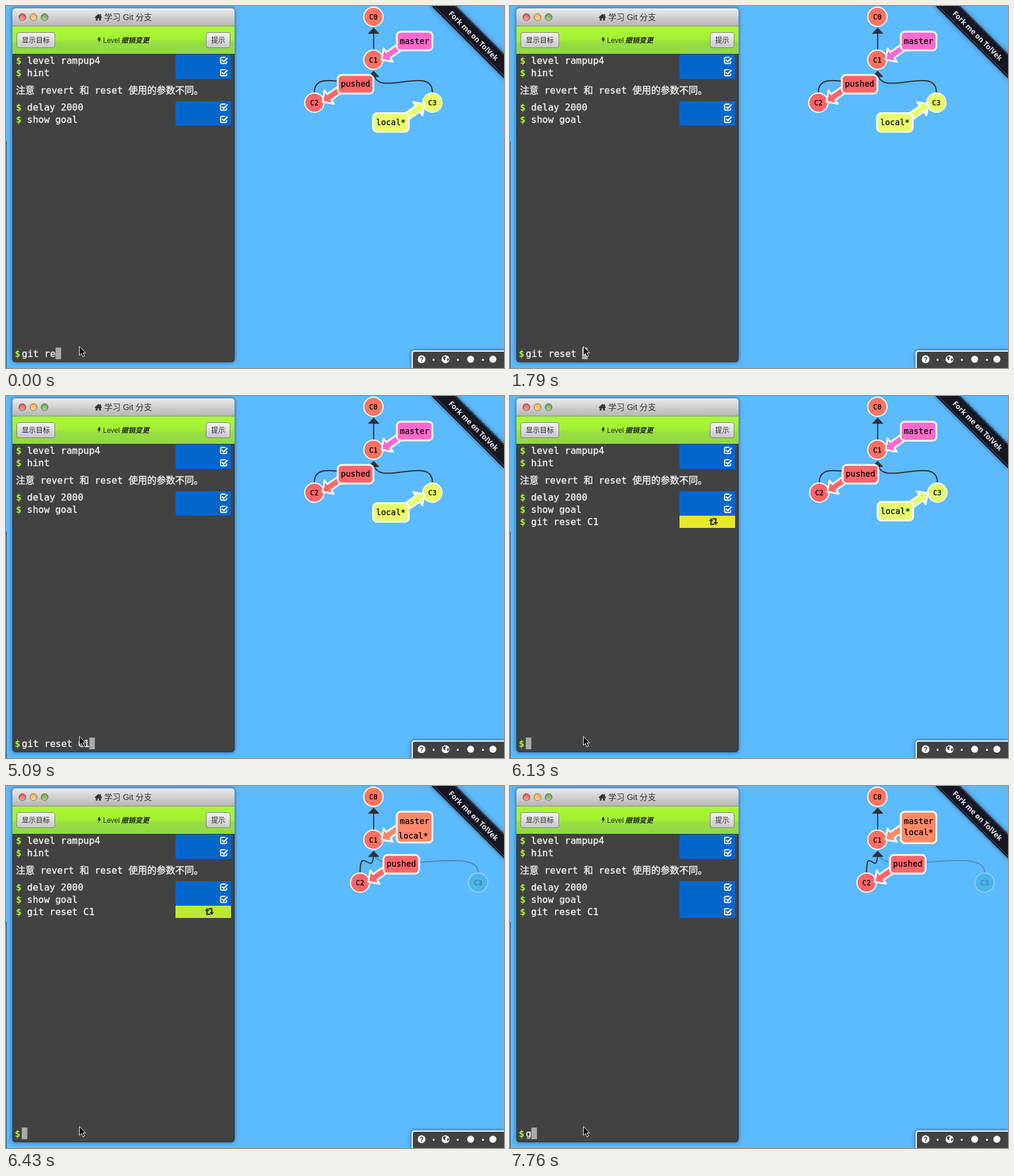
An HTML page that plays this animation: 852 px wide and 620 px high, repeating every 8 s.

```html
<!DOCTYPE html>
<html lang="zh">
<head>
<meta charset="utf-8">
<title>Git 分支</title>
<style>
html, body { margin: 0; width: 100%; height: 100%; overflow: hidden; background: #5cbaff; }
svg { display: block; width: 852px; height: 620px; }
.mono { font-family: "DejaVu Sans Mono", "Noto Sans CJK SC", "Noto Sans CJK", monospace; }
.ui { font-family: "Liberation Sans", "Noto Sans CJK SC", "Noto Sans CJK", sans-serif; }
.term { font-size: 16px; white-space: pre; }
.term text { fill: #f0f0f0; stroke: #f0f0f0; stroke-width: .4; }
.term .prompt { fill: #a6f33a; stroke: none; font-weight: bold; }
.tag, .node { text-anchor: middle; fill: #000; stroke: #000; stroke-width: .25; }
.tag { font-size: 14px; }
.node { font-size: 12px; }
.box { stroke: #fff; stroke-width: 3; stroke-linejoin: round; }
.ring { stroke: #fff; stroke-width: 2; }
.edge { fill: none; stroke: #2e2e31; stroke-width: 2; }
.head { fill: #2e2e31; stroke: #2e2e31; }
.btn { fill: url(#btnFill); stroke: #7d7d7d; }
.mid { text-anchor: middle; }
</style>
</head>
<body>
<svg viewBox="0 0 852 620">
  <defs>
    <linearGradient id="barFill" x2="0" y2="1"><stop stop-color="#ebebeb"/><stop offset="1" stop-color="#b4b4b4"/></linearGradient>
    <linearGradient id="limeFill" x2="0" y2="1"><stop stop-color="#a9f833"/><stop offset=".48" stop-color="#a4f034"/><stop offset=".6" stop-color="#96de42"/><stop offset="1" stop-color="#91d945"/></linearGradient>
    <linearGradient id="btnFill" x2="0" y2="1"><stop stop-color="#f4f4f4"/><stop offset="1" stop-color="#c6c6c6"/></linearGradient>
    <linearGradient id="gloss" x2="0" y2="1"><stop stop-color="#fff" stop-opacity=".1"/><stop offset="1" stop-color="#fff" stop-opacity=".5"/></linearGradient>
    <filter id="shadow" x="-10%" y="-10%" width="120%" height="120%"><feDropShadow dx="0" dy="0" stdDeviation="3.5" flood-opacity=".55"/></filter>
    <symbol id="check" viewBox="0 0 17 15" width="17" height="15" overflow="visible">
      <path d="M12.5 8.5v1.8a2.2 2.2 0 0 1-2.2 2.2h-6a2.2 2.2 0 0 1-2.2-2.2v-6a2.2 2.2 0 0 1 2.2-2.2h6.2" fill="none" stroke="currentColor" stroke-width="2"/>
      <path d="M4.5 6.3l3 3 6.4-6.4" fill="none" stroke="currentColor" stroke-width="2.5"/>
    </symbol>
  </defs>

  <rect width="852" height="620" fill="#5cbaff"/>
  <rect y="232" width="1" height="388" fill="#34424f"/>

  <g id="tree" class="mono"></g>

  <!-- ribbon -->
  <g filter="url(#shadow)"><path d="M726 -2L854 126V84L768 -2z" fill="#161922"/></g>
  <path d="M731 -1L853 121M767 -1L853 85" stroke="#5b606c" fill="none"/>
  <text transform="translate(800 51) rotate(45)" y="4.5" class="mid" font-family="'Open Sans', sans-serif" font-size="12.5" font-weight="700" fill="#e4e6ea">Fork me on TolVek</text>

  <!-- window -->
  <g filter="url(#shadow)"><rect x="11" y="4" width="380" height="606" rx="5" fill="#424242"/></g>
  <path d="M11 35V9a5 5 0 0 1 5-5H386a5 5 0 0 1 5 5V35z" fill="url(#barFill)"/>
  <rect x="11" y="34" width="380" height="1" fill="#8a8f86"/>
  <rect x="11" y="35" width="380" height="47" fill="url(#limeFill)"/>
  <rect x="11" y="82" width="380" height="1" fill="#33372c"/>
  <path d="M11.5 82V604.5a5 5 0 0 0 5 5H385.5a5 5 0 0 0 5-5V82" fill="none" stroke="#303030"/>
  <g id="lights"></g>
  <path d="M151.5 19.5L158 13.5l2.5 2.3V14h2v3.7l2 1.8-1 1-1-.8V25h-3.3v-3.8h-2.4V25h-3.3v-5.3l-1 .8z" fill="#333"/>
  <g class="ui" fill="#222">
    <text x="168" y="24" font-size="14" fill="#333">学习 Git 分支</text>
    <rect class="btn" x="18.5" y="45.5" width="65" height="26" rx="3.5"/>
    <rect class="btn" x="342.5" y="45.5" width="41" height="26" rx="3.5"/>
    <g font-size="12">
      <text class="mid" x="51" y="63">显示目标</text>
      <text class="mid" x="363" y="63">提示</text>
      <path d="M158.5 53.5h3l-1.2 3h2.3l-4.6 7 1-4.7h-2.5z" fill="#333"/>
      <text x="166" y="63">Level</text>
      <text x="197" y="63" font-style="italic" font-weight="bold">撤销变更</text>
    </g>
  </g>

  <!-- terminal -->
  <g id="history" class="mono term">
    <text x="17" y="150">注意 revert 和 reset 使用的参数不同。</text>
  </g>
  <g id="last" class="mono term">
    <rect id="status" x="290" y="205" width="95" height="21"/>
    <rect id="waiting" x="317" y="210" width="11" height="11" rx="2" fill="none" stroke="#333" stroke-width="2"/>
    <g id="busy" transform="translate(340 209)" fill="#333">
      <path d="M4 4v6.7h5.5M6.5 1.3H12V8" fill="none" stroke="#333" stroke-width="2.6"/>
      <path d="M0 5L4 0l4 5zM8 7l4 5 4-5z"/>
    </g>
    <use id="done" href="#check" x="365" y="208"/>
    <text class="prompt" x="17" y="221">$</text>
    <text x="36" y="221">git reset C1</text>
  </g>
  <g class="mono term">
    <text class="prompt" x="15" y="601">$</text>
    <text id="typed" x="27" y="601"></text>
    <rect id="caret" y="585" width="9.5" height="20" fill="#aaa"/>
  </g>

  <!-- footer -->
  <g filter="url(#shadow)"><path d="M694 622V595a5 5 0 0 1 5-5H854V622z" fill="#fff"/></g>
  <path d="M696 622V595.5a3.5 3.5 0 0 1 3.5-3.5H854V622z" fill="#424242"/>
  <g fill="#fff">
    <circle cx="711" cy="605" r="6.7"/>
    <text class="ui mid" x="711" y="609" font-size="11" font-weight="bold" fill="#333">?</text>
    <circle cx="752" cy="605" r="6.7"/>
    <path d="M747.5 601.5l3.5-2 2 2-2 2 1 2-1.5 1.5-2-2zM754.5 604l3-1v3.5l-2.5 2.500z" fill="#424242"/>
    <circle cx="795" cy="605" r="6"/>
    <circle cx="833" cy="605" r="6"/>
    <circle cx="731.5" cy="606" r="1.7"/><circle cx="773" cy="606" r="1.7"/><circle cx="816" cy="606" r="1.7"/>
  </g>

  <path d="M125.5 583v15.2l3.5-3.2 2.6 5.9 2.7-1.2-2.6-5.7h4.6z" fill="#000" stroke="#fff"/>
</svg>

<script>
const LOOP = 8000;
const typing = [
  [0, 'git re'], [150, 'git res'], [450, 'git rese'], [750, 'git reset'], [1790, 'git reset '],
  [3290, 'git reset C'], [5090, 'git reset C1'], [5690, ''], [7760, 'g']
];
// The picture only changes at these times.
const ticks = [...typing.map(s => s[0]), 6130, 6280, 6430, 6580, 6720, 6870, 7020, 7170].sort((a, b) => a - b);

const $ = id => document.getElementById(id);
const set = (node, attrs) => {
  for (const k in attrs) node.setAttribute(k, attrs[k]);
  return node;
};
const el = (parent, tag, attrs, text) => {
  const node = set(document.createElementNS('http://www.w3.org/2000/svg', tag), attrs);
  if (text) node.textContent = text;
  return parent.appendChild(node);
};
const clamp = x => Math.min(1, Math.max(0, x));
const mix = (a, b, p) => a + (b - a) * p;
const mixAll = (a, b, p) => a.map((v, i) => mix(v, b[i], p));
const blend = (a, b, p) => `rgb(${mixAll(a, b, p).map(Math.round)})`;

// Ease in and out: a cubic Bezier curve solved in closed form.
function ease(n) {
  const q = .48 - n / 1.04, r = Math.sqrt(.1734 + q * q);
  const s = clamp(Math.cbrt(r - q) + Math.cbrt(-r - q) + .5);
  return s * s * (3 - 2 * s);
}

// Arrow with its tip at x, y; dir 1 has the shaft up right, -1 down left.
function arrowPath(x, y, dir) {
  const c = .82 * dir, s = -.57 * dir;
  const pts = [[0, 0], [14, -14], [14, -6], [46, -6], [46, 6], [14, 6], [14, 14]];
  return 'M' + pts.map(([a, b]) => `${x + a * c - b * s} ${y + a * s + b * c}`).join('L') + 'z';
}
const edgePath = x => `M${x} 148C${x} 98 629 162 629 112`;

// Commit tree
const tree = $('tree');
const PINK = [255, 105, 205], ORANGE = [255, 138, 102], LEMON = [233, 255, 104], TEAL = [42, 168, 191];
const YELLOW = [230, 232, 40], LIME = [160, 236, 60], BLUE = [0, 102, 204];

function commit(name, x, y, fill) {
  const g = el(tree, 'g', {});
  const ring = el(g, 'circle', { class: 'ring', cx: x, cy: y, r: 16.5, fill });
  el(g, 'text', { class: 'node', x, y: y + 4.5 }, name);
  return { g, ring };
}
function label(x, y, tipX, tipY, dir, fill) {
  const g = el(tree, 'g', { fill });
  const arrow = el(g, 'path', { class: 'box', d: arrowPath(tipX, tipY, dir) });
  const box = el(g, 'rect', { class: 'box', x: x - 30.5, y: y - 16, width: 61, height: 32, rx: 7 });
  return { g, arrow, box };
}
const tagText = (parent, name, x, y) => el(parent, 'text', { class: 'tag', x, y: y + 4.5 }, name);

const edge3 = el(tree, 'path', { class: 'edge' });
const edge2 = el(tree, 'path', { class: 'edge' });
el(tree, 'path', { class: 'edge', d: 'M629 75V40' });
el(tree, 'path', { class: 'head', d: 'M629 37.500l9 9.500h-18zM629 111.500l9 9.500h-18z' });
commit('C0', 628.5, 18.5, '#ff7563');
commit('C1', 628.5, 92, '#ff7164');
const c2 = commit('C2', 527.5, 165.5, '#ff656b');
const c3 = commit('C3', 729.5, 165.5);
const local = label(658.5, 199.5, 716, 168, -1, `rgb(${LEMON})`);
const master = label(699, 60, 642.5, 92, 1);
tagText(master.g, 'master', 699, 60);
const pushed = label(598, 134, 541.5, 164, 1, '#ff666b');
tagText(pushed.g, 'pushed', 598, 133.5);
const localText = tagText(tree, 'local*', 658.5, 199.5);

// Window lights and finished commands
['#e8564f', '#f0b354', '#6aa94a'].forEach((fill, i) => {
  const cx = 28 + 19 * i;
  el($('lights'), 'circle', { cx, cy: 19, r: 6, fill, stroke: '#00000066' });
  el($('lights'), 'circle', { cx, cy: 20, r: 4.5, fill: 'url(#gloss)' });
});
[['level rampup4', 83], ['hint', 104], ['delay 2000', 163], ['show goal', 184]].forEach(([cmd, y]) => {
  const g = $('history');
  el(g, 'rect', { x: 290, y, width: 95, height: 21, fill: `rgb(${BLUE})` });
  el(g, 'use', { href: '#check', x: 365, y: y + 3, color: '#fff' });
  el(g, 'text', { class: 'prompt', x: 17, y: y + 16 }, '$');
  el(g, 'text', { x: 36, y: y + 16 }, cmd);
});

function drawTree(p) {
  const shift = 82.5 * p, fade = 1 - .7 * p;
  const transform = `translate(${shift} 0)`;
  set(c2.g, { transform });
  set(pushed.g, { transform });
  set(c3.g, { transform, opacity: fade });
  set(c3.ring, { fill: blend(LEMON, TEAL, p) });
  set(edge2, { d: edgePath(527.5 + shift) });
  set(edge3, { d: edgePath(729.5 + shift), opacity: fade });

  set(master.g, { fill: blend(PINK, ORANGE, p) });
  set(master.box, { height: 32 + 22 * p });

  const move = `translate(${40.5 * p} ${-120 * p})`;
  set(local.g, { opacity: 1 - p });
  set(local.box, { transform: move });
  set(local.arrow, { d: arrowPath(mix(716, 642.5, p), mix(168, 92, p), mix(-1, 1, p)) });
  set(localText, { transform: move });
}

function drawStatus(t) {
  const run = clamp((t - 6130) / 500), end = clamp((t - 6580) / 500);
  const show = (id, on) => { $(id).style.display = on ? '' : 'none'; };
  show('last', t >= 5690);
  show('waiting', t < 6130);
  show('busy', t >= 6130 && t < 6580);
  show('done', t >= 6580);
  set($('status'), { fill: blend(mixAll(YELLOW, LIME, run), BLUE, end) });
  set($('done'), { color: blend([51, 51, 51], [255, 255, 255], end) });
}

function draw(now) {
  const clock = now % LOOP;
  const t = ticks.filter(x => x <= clock).pop();
  const text = typing.filter(s => s[0] <= t).pop()[1];
  $('typed').textContent = text;
  set($('caret'), { x: 27 + text.length * 9.63 });
  drawTree(ease(clamp((t - 6090) / 405)));
  drawStatus(t);
}

const start = performance.now();
function frame() {
  draw(performance.now() - start);
  requestAnimationFrame(frame);
}
frame();
</script>
</body>
</html>
```
